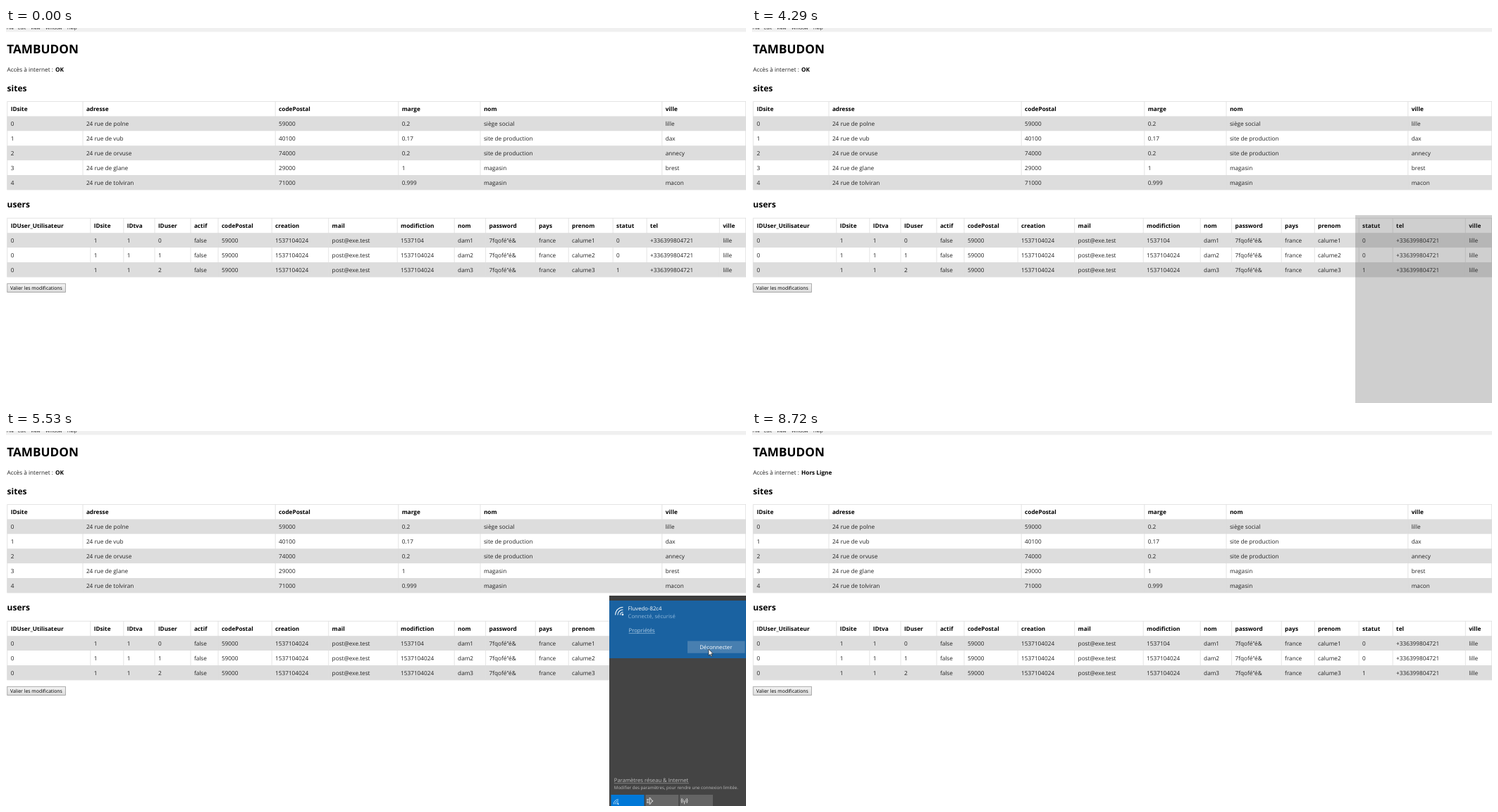
Animation of 1050 by 533 pixels, one loop 9.5 s. Source, as an HTML page:

```html
<!DOCTYPE html>
<html lang="fr">
<head>
<meta charset="utf-8">
<title>Tables</title>
<style>
  html, body { margin: 0; width: 100%; height: 100%; overflow: hidden; background: #fff; }
  svg { display: block; width: 100vw; height: 100vh; }
  text { font-family: "Open Sans", "Noto Sans", sans-serif; text-rendering: geometricPrecision; white-space: pre; }
</style>
</head>
<body>
<svg id="stage" viewBox="0 0 1050 533">
  <defs>
    <linearGradient id="btn" x2="0" y2="1">
      <stop offset="0" stop-color="#f4f4f4"/><stop offset="1" stop-color="#dcdcdc"/>
    </linearGradient>
  </defs>
</svg>
<script>
const LOOP = 9500;
const stage = document.getElementById('stage');

function el(parent, tag, attrs) {
  const node = document.createElementNS('http://www.w3.org/2000/svg', tag);
  for (const k in attrs) node.setAttribute(k, attrs[k]);
  parent.appendChild(node);
  return node;
}
const group = (parent) => el(parent, 'g', {});
const rect = (p, x, y, width, height, fill, more) => el(p, 'rect', { x, y, width, height, fill, ...more });
const path = (p, d, stroke, width, more) =>
  el(p, 'path', { d, fill: 'none', stroke, 'stroke-width': width, ...more });
function text(p, x, y, str, size, fill = '#222', more = {}) {
  const node = el(p, 'text', { x, y, 'font-size': size, fill, ...more });
  node.textContent = str;
  return node;
}
const BOLD = { 'font-weight': 700 };
const show = (node, on) => node.setAttribute('visibility', on ? 'inherit' : 'hidden');

// Page
const PITCH = 20.9, BODY = 8.22;

function table(top, xs, head, rows) {
  const bottom = top + PITCH * (rows.length + 1);
  rows.forEach((_, i) => {
    if (i % 2 === 0) rect(stage, 1.5, top + PITCH * (i + 1), 1048.5, PITCH, '#ddd');
  });
  const lines = xs.map(x => `M${x} ${top}V${bottom}`).join('');
  path(stage, `${lines}M1049.6 ${top}V${bottom}M1.5 ${top}H1050M1.5 ${bottom}H1050`, '#ddd', 0.8);
  [head, ...rows].forEach((row, r) => row.forEach((cell, c) =>
    text(stage, xs[c] + 4.9, top + PITCH * r + 13.7, cell, BODY, r ? '#222' : '#000', r ? {} : BOLD)));
}

rect(stage, 0, 0, 1050, 5.5, '#f0f0f0');
[['File', 1], ['Edit', 17], ['View', 35], ['Window', 56], ['Help', 87]]
  .forEach(([s, x]) => text(stage, x, 2.3, s, 6.3));
text(stage, 1.2, 36.2, 'TAMBUDON', 17.2, '#000', BOLD);
text(stage, 1.6, 62.2, 'Accès à internet : ', BODY);
const status = text(stage, 70, 62.2, 'OK', BODY, '#000', BOLD);
text(stage, 1.6, 89.6, 'sites', 12, '#000', BOLD);
text(stage, 1.6, 255.4, 'users', 12, '#000', BOLD);

table(104.5, [1.8, 109, 382.2, 556.8, 673, 930.8],
  ['IDsite', 'adresse', 'codePostal', 'marge', 'nom', 'ville'], [
    ['0', '24 rue de polne', '59000', '0.2', 'siège social', 'lille'],
    ['1', '24 rue de vub', '40100', '0.17', 'site de production', 'dax'],
    ['2', '24 rue de orvuse', '74000', '0.2', 'site de production', 'annecy'],
    ['3', '24 rue de glane', '29000', '1', 'magasin', 'brest'],
    ['4', '24 rue de tolviran', '71000', '0.999', 'magasin', 'macon']
  ]);

const STAMP = '1537104024';
const user = (id, modified, last, first, state) => ['0', '1', '1', id, 'false', '59000', STAMP,
  'post@exe.test', modified, last, '7fqofé"é&', 'france', first, state, '+336399804721', 'lille'];
table(270.3, [1.8, 119.8, 166.8, 211, 262, 301, 377.2, 457.7, 555.2, 636.2, 680.6, 751.2, 798.2, 861.2, 909.2, 1012.3],
  ['IDUser_Utilisateur', 'IDsite', 'IDtva', 'IDuser', 'actif', 'codePostal', 'creation', 'mail',
    'modifiction', 'nom', 'password', 'pays', 'prenom', 'statut', 'tel', 'ville'], [
    user('0', '1537104', 'dam1', 'calume1', '0'),
    user('1', STAMP, 'dam2', 'calume2', '0'),
    user('2', STAMP, 'dam3', 'calume3', '1')
  ]);

rect(stage, 1.8, 363.3, 82.6, 12.2, 'url(#btn)', { stroke: '#a2a2a2', 'stroke-width': 0.9 });
text(stage, 6, 372, 'Valier les modifications', 6.88, '#000');

// Network panel
const panel = group(stage);
rect(panel, 856, 234, 194, 340, '#444');
const content = group(panel);
rect(content, 856, 234, 194, 7, '#3d3d3d');
const card = rect(content, 856, 241, 194, 82, '#0e6ab8');

// Quarter arcs around a dot in the lower right corner.
function wifi(x, y, s) {
  const g = el(content, 'g', { transform: `translate(${x} ${y}) scale(${s})` });
  [4, 7.5, 11].forEach(r => path(g, `M${-r} 0A${r} ${r} 0 0 1 0 ${-r}`, '#fff', 1.1));
  el(g, 'circle', { r: 1.4, cx: -0.6, cy: -0.6, fill: '#fff' });
}
wifi(875.5, 261.5, 1);
text(content, 882.6, 255.2, 'Fluvedo-82c4', 7.75, '#fff');
const detail = text(content, 882.6, 266.3, '', 7.7, '#8db7db');

const linked = group(content);
text(linked, 883.6, 286, 'Propriétés', 7.7, '#b4d0e8');
path(linked, 'M883.6 287.6H920.8', '#b4d0e8', 0.6);

const unlinked = group(content);
rect(unlinked, 883.3, 277.5, 9.8, 9.8, 'none', { stroke: '#e4edf5', 'stroke-width': 1 });
text(unlinked, 898, 285.2, 'Se connecter automatiquement', 7.7, '#fff');

const button = rect(content, 967, 298.5, 81.5, 17.2, '#3c86c6', { 'stroke-width': 1 });
const label = text(content, 1007.3, 310.2, '', 7.75, '#fff', { 'text-anchor': 'middle' });

text(content, 862.8, 499, 'Paramètres réseau & Internet', 7.66, '#bdbdbd');
path(content, 'M862.8 500.7H969', '#a8a8a8', 0.6);
text(content, 862.8, 508.7, 'Modifier des paramètres, pour rendre une connexion limitée.', 6.2, '#bababa');
rect(content, 858.5, 517, 47, 18, '#0078d7');
rect(content, 907.5, 517, 46.8, 18, '#666');
rect(content, 956, 517, 47, 18, '#646464');
wifi(869, 530.5, 0.62);
path(content, 'M909.7 523.5H911.3L912.3 525H913.6L912.8 521.6H914.4L916 525H917.3Q918.6 525.9 917.3 526.8H916L914.4 530.2H912.8L913.6 526.8H912.3L911.3 528.3H909.7L910.3 525.9Z', '#fff', 0.75);
const hotspot = group(content);
path(hotspot, 'M962.6 525.2V530.4M960.8 523.5Q959.6 525.5 960.8 527.5M964.4 523.5Q965.6 525.5 964.4 527.5M959.2 522Q957.2 525.5 959.2 529M966 522Q968 525.5 966 529', '#fff', 0.75);

const cursor = el(stage, 'path', {
  d: 'M0 0V9.2L2.1 7.3L3.6 10.5L4.9 9.9L3.5 6.8H6.3Z', fill: '#fff', stroke: '#222', 'stroke-width': 0.7
});

// Motion: [start, end, steps, points, leaves the stage on the last step]
const MOVES = [
  [400, 560, 3, [[940, 513], [860, 471], [811, 446]]],
  [710, 950, 4, [[805, 440], [842, 466], [901, 518]], true],
  [1260, 1640, 6, [[883, 523], [21, 46]]],
  [1810, 2130, 5, [[42, 54], [66, 65], [72, 65], [69, 61], [67, 58]]],
  [2360, 2900, 8, [[75, 64], [863, 510]], true],
  [4600, 5220, 9, [[1004, 524], [1000, 400], [994, 316], [996, 312], [997, 310]]],
  [6460, 7020, 8, [[992, 314], [784, 405]]],
  [7800, 8030, 4, [[773, 409], [776, 408], [779, 406], [779, 406]]],
  [8340, 8720, 6, [[792, 414], [986, 521]], true]
];

const stepAt = (t, a, b, n) =>
  Math.max(-1, Math.min(n - 1, Math.floor((t - a) / (b - a) * (n - 1) + 0.01)));

function along(pts, p) {
  if (pts.length === 2) p = p * p * (3 - 2 * p);
  const q = p * (pts.length - 1), i = Math.min(Math.floor(q), pts.length - 2);
  return [0, 1].map(k => pts[i][k] + (pts[i + 1][k] - pts[i][k]) * (q - i));
}

function pointer(t) {
  const move = MOVES.filter(m => t >= m[0]).pop();
  if (!move) return null;
  const [a, b, n, pts, leaves] = move;
  const i = stepAt(t, a, b, n);
  if (leaves && i === n - 1) return null;
  return along(pts, i / (leaves ? n - 2 : n - 1));
}

function drawPanel(t) {
  const opening = stepAt(t, 4290, 5220, 13);
  const closing = stepAt(t, 7800, 8030, 4);
  show(panel, opening >= 0 && closing < 3);
  let alpha = [0.25, 0.65, 0.92][opening] ?? 1;
  let drop = [32, 14, 4][opening] ?? 0;
  if (closing >= 0) {
    alpha = [0.65, 0.3, 0.1, 0][closing];
    drop = 6 * (closing + 1);
  }
  panel.setAttribute('opacity', alpha);
  panel.setAttribute('transform', `translate(0 ${drop})`);
  content.setAttribute('opacity', opening === 0 ? 0 : opening === 1 ? 0.6 : 1);

  const off = t >= 5850, hover = off && t < 6530;
  show(linked, !off);
  show(unlinked, off);
  detail.textContent = off ? 'Sécurisé' : 'Connecté, sécurisé';
  label.textContent = off ? 'Se connecter' : 'Déconnecter';
  label.setAttribute('x', off ? 1006 : 1007.3);
  button.setAttribute('x', off ? 966 : 967);
  card.setAttribute('fill', t >= 5300 ? '#1a62a1' : '#0e6ab8');
  button.setAttribute('fill', hover ? '#5488b7' : t >= 5300 ? '#487fb0' : '#3c86c6');
  button.setAttribute('stroke', hover ? '#a3c0d9' : 'none');
  hotspot.setAttribute('opacity', t >= 6080 ? 0.3 : 1);
}

function draw(t) {
  status.textContent = t >= 6700 ? 'Hors Ligne' : 'OK';
  drawPanel(t);
  const at = pointer(t);
  show(cursor, at);
  if (at) cursor.setAttribute('transform', `translate(${at[0]} ${at[1]})`);
}

const start = performance.now();
function tick() {
  draw((performance.now() - start) % LOOP);
  requestAnimationFrame(tick);
}
tick();
</script>
</body>
</html>
```
